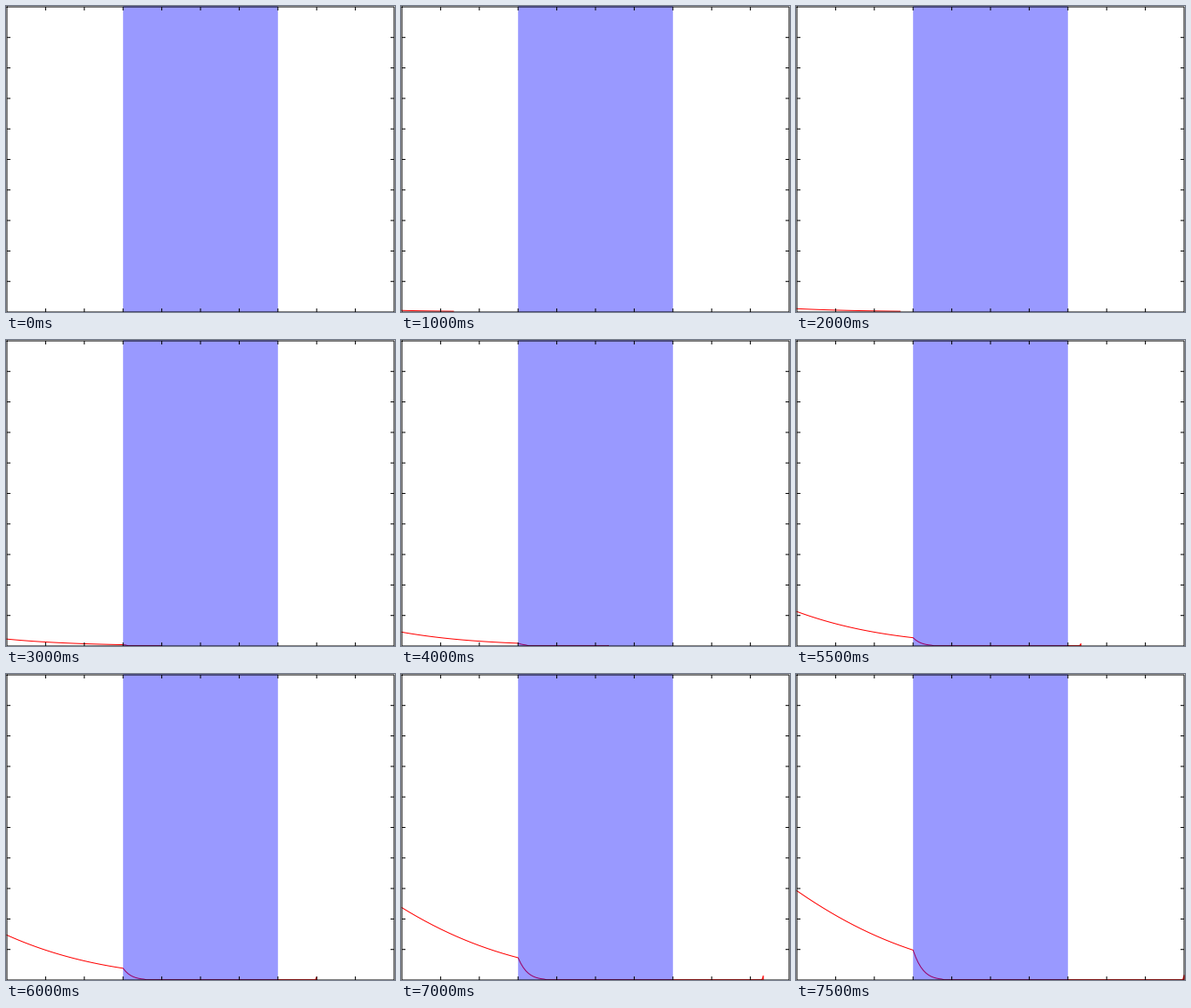
Write a matplotlib script that moves like this. It is 436 px wide and 344 px high and loops after 8 s.

```python
import numpy as np
import matplotlib.pyplot as plt
from matplotlib.animation import FuncAnimation

W, H, DPI = 436, 344, 100
PX = 72 / DPI                    # one pixel in points
FRAMES, INTERVAL = 16, 500

LEFT, RIGHT, TOP, BOTTOM = 1, 435, 1, 344
TICK = 4
CELLS, CELLS_PER_FRAME = 150, 10
CELL = (RIGHT - LEFT) / CELLS
SPEED = CELL * CELLS_PER_FRAME   # pixels per frame in free space
SLAB = (LEFT + 0.3 * (RIGHT - LEFT), LEFT + 0.7 * (RIGHT - LEFT))
SLOWDOWN = 9                     # refractive index of the slab
PEAK, PEAK_TIME, SPREAD = 284, 25.4, 103.6
ZERO = BOTTOM - 0.3              # height of the resting curve

fig = plt.figure(figsize=(W / DPI, H / DPI), dpi=DPI, facecolor="white")
ax = fig.add_axes([0, 0, 1, 1])
ax.set_xlim(0, W)
ax.set_ylim(H, 0)
ax.axis("off")


def stroke(xs, ys, color="black", z=4, cap="butt"):
    line, = ax.plot(xs, ys, color=color, lw=PX, zorder=z, snap=False,
                    solid_capstyle=cap, clip_on=False)
    return line


def draw_frame():
    stroke([LEFT, RIGHT, RIGHT, LEFT, LEFT], [TOP, TOP, BOTTOM, BOTTOM, TOP],
           cap="projecting")
    for x in np.linspace(LEFT, RIGHT, 11)[1:-1]:
        stroke([x, x], [TOP, TOP + TICK])
        stroke([x, x], [BOTTOM - TICK, BOTTOM])
    for y in np.linspace(TOP, BOTTOM, 11)[1:-1]:
        stroke([LEFT, LEFT + TICK], [y, y])
        stroke([RIGHT - TICK, RIGHT], [y, y])


def pulse(t):
    """Gaussian source, switched on at t = 0."""
    return np.where(t >= 0, PEAK * np.exp(-(t - PEAK_TIME) ** 2 / SPREAD), 0)


def delay(x):
    """Travel time in frames from the left edge to x."""
    inside = np.clip(x, *SLAB) - SLAB[0]
    return (x - LEFT + (SLOWDOWN - 1) * inside) / SPEED


def wave(t):
    x = LEFT + CELL * np.arange(CELLS_PER_FRAME * t + 1)
    y = ZERO - pulse(t - delay(x))
    # sharp precursor at the front
    front = x[-1]
    tip = max(0, 0.7 * (t - 7.7))
    x = np.append(x[:-1], [front - CELL / 2, front, front])
    y = np.append(y, [y[-1] - tip, y[-1]])
    return x, y


draw_frame()
ax.axvspan(*SLAB, color="blue", alpha=0.4, lw=0, zorder=3, snap=False)
curve = stroke([], [], "red", 2, "projecting")


def update(i):
    if i:
        curve.set_data(*wave(i))
    else:
        curve.set_data([], [])
    return curve,


anim = FuncAnimation(fig, update, frames=FRAMES, interval=INTERVAL,
                     repeat=True, repeat_delay=0, blit=False)
plt.show()
```
